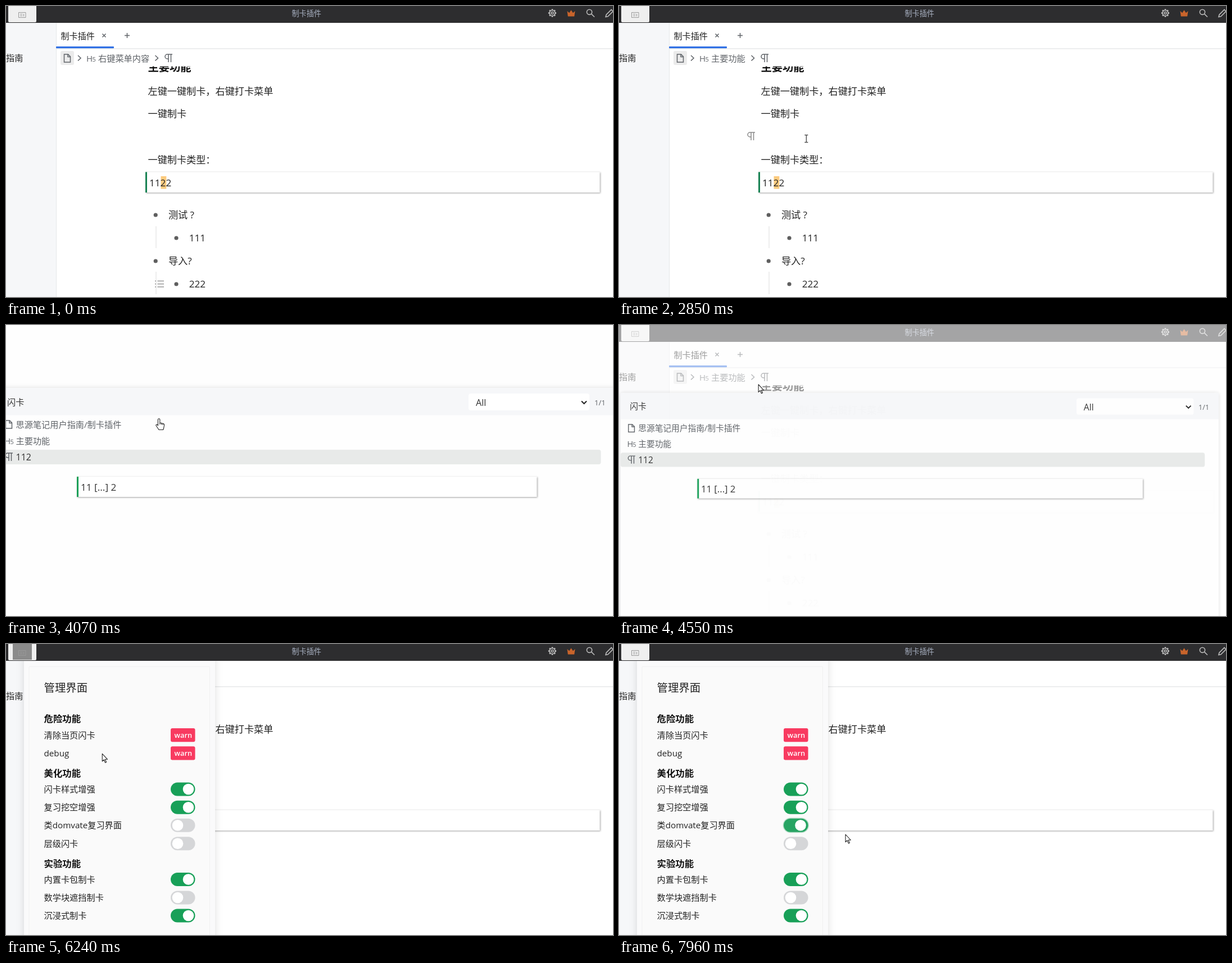
An HTML page for the animation above (8 s loop, 1080x518 px).

```html
<!DOCTYPE html>
<html lang="zh-CN">
<head>
<meta charset="utf-8">
<style>
  html, body { margin: 0; width: 100%; height: 100%; overflow: hidden; background: #fff; }
  svg { display: block; width: 100vw; height: 100vh; }
  text { font-family: "Open Sans", "Noto Sans CJK SC", "Noto Sans CJK", sans-serif; white-space: pre; }
  .line { fill: none; stroke: #5f6368; stroke-width: 1.5; }
  .lift { filter: drop-shadow(1px 1.5px 1.5px rgba(0, 0, 0, .38)); }
  .cursor { fill: #fff; stroke: #222; stroke-width: 1.1; stroke-linejoin: round; }
</style>
</head>
<body>
<svg id="stage" viewBox="0 0 1080 518"></svg>
<script>
const INK = '#222', GREY = '#5f6368', BODY = 17.15, LABEL = 15.2;

// Text placed by its left edge and vertical middle
const text = (x, y, size, str, fill = INK, extra = '') =>
  `<text x="${x}" y="${y + size * .37}" font-size="${size}" fill="${fill}" ${extra}>${str}</text>`;
const rect = (x, y, w, h, fill, r = 0, extra = '') =>
  `<rect x="${x}" y="${y}" width="${w}" height="${h}" rx="${r}" fill="${fill}" ${extra}/>`;
const line = (d, extra = '') => `<path class="line" d="${d}" ${extra}/>`;
const dot = (x, y, r = 3.6, fill = '#5f5f5f', extra = '') =>
  `<circle cx="${x}" cy="${y}" r="${r}" fill="${fill}" ${extra}/>`;
const group = (id, content) => `<g id="${id}">${content}</g>`;

const chevron = x => line(`M${x - 2.5} 88l5 4.7-5 4.7`);
const pageIcon = (x, y) => line(`M${x - 5.5} ${y - 7}h7l4 4v10h-11zM${x + 1} ${y - 7}v4.5h4.5`);
const pilcrow = (x, y, extra) =>
  line(`M${x + 7} ${y - 7}H${x - 2}a4 4 0 0 0 0 8h2M${x} ${y - 7}v14M${x + 4.5} ${y - 7}v14`, extra);
const heading5 = (x, y, fill = GREY) => text(x, y, 15, 'H', fill) + text(x + 10.5, y + 1.5, 11, '5', fill);
const card = (x, y, w, h, green) =>
  rect(x, y, w, h, '#fff', 0, 'class="lift"') + rect(x, y, 3, h, green);

const crumb = (id, label, shift) => group(id,
  text(164, 93, LABEL, label, GREY) + `<g transform="translate(${shift})">${chevron(268)}${pilcrow(289, 93)}</g>`);

const bullet = (x, y, str) => dot(x, y) + text(x + 22.7, y, BODY, str);

const doc =
  rect(0, 30, 89, 488, '#f6f7f9') + rect(89, 30, 1, 488, '#e6e7e9') +
  text(0, 92, LABEL, '指南') +
  text(252.5, 109, 19.3, '主要功能', '#111', 'font-weight="700"') +
  rect(90, 30, 990, 77.5, '#fff') + rect(89, 75.5, 991, 1, '#dcdee0') +
  text(97.5, 53, 15.1, '制卡插件') + rect(89, 72, 103, 3.2, '#2f6fe4', 1) +
  line('M171.5 49.5l6 6m0-6l-6 6M211 52.5h9M215.5 48v9') +
  rect(97, 80, 24, 25, '#ebebeb', 3) + pageIcon(109, 93) + chevron(130.5) + heading5(143, 93) +
  crumb('crumbBefore', '右键菜单内容', 0) + crumb('crumbAfter', '主要功能', -30) +
  text(252.5, 151.5, BODY, '左键一键制卡，右键打卡菜单') +
  text(252.5, 191.5, BODY, '一键制卡') +
  text(252.5, 273.5, BODY, '一键制卡类型：') +
  card(248, 295.5, 808.5, 36.5, '#1a8455') +
  rect(275.5, 303, 9.8, 22.5, '#fdcb7f') + text(255, 314.5, BODY, '1122') +
  rect(266.5, 392, 1, 39, '#dedede') + rect(266.5, 473, 1, 40, '#dedede') +
  bullet(266.2, 372, '测试 ?') + bullet(303, 413, '111') +
  bullet(266.2, 454, '导入?') + bullet(303, 495, '222') +
  group('listGutter', [489.5, 494.7, 500].map(y =>
    line(`M265 ${y}h2m2.5 0h11.5`, 'style="stroke:#999"')).join('')) +
  group('blankGutter', pilcrow(235, 232, 'style="stroke:#888"')) +
  group('headGutter', heading5(207.5, 127, '#8a8a8a') + '<path d="M233 122.5h11l-5.5 8.5z" fill="#777"/>') +
  group('caret', rect(252, 221, 1.3, 23, INK));

const gearTeeth = Array.from({ length: 8 }, (_, i) =>
  `<path d="M972 5.4v2.4" stroke="#bbb" stroke-width="2.6" transform="rotate(${i * 45} 972 12.5)"/>`).join('');

const topBar =
  rect(0, 0, 1080, 30, '#2d2d2f') +
  text(508.5, 13.5, 13.1, '制卡插件', '#a9b2c3') +
  gearTeeth + '<g fill="none" stroke="#bbb" stroke-width="1.6"><circle cx="972" cy="12.5" r="5"/>' +
  '<circle cx="972" cy="12.5" r="2"/><circle cx="1038" cy="10.8" r="4.6"/>' +
  '<path d="M1041.5 14.2l5.5 5.3M1067 19.5l1-4 9-9 3 3-9 9z"/></g>' +
  '<path d="M998.5 9l3.7 3.3 3.3-5 3.3 5 3.7-3.3-1.3 9.5h-11.4z" fill="#c8642b"/>' +
  rect(4, -3, 50, 32, '#efefef', 2) + group('pressed', rect(12, 0, 34, 28, '#8b8b8b')) +
  '<path d="M22.5 11.5h12.5v9h-12.5zM25 14.5h4.5M25 17.5h4.5M31.5 14v4.5" fill="none" stroke="#999"/>';

const dialog =
  rect(-15, 112, 1099, 700, '#fefefe', 4, 'style="filter:drop-shadow(0 0 4px rgba(0,0,0,.13))"') +
  rect(-15, 112.5, 1099, 48, '#f6f7f9') +
  text(2, 137, LABEL, '闪卡', '#333') +
  rect(823, 122, 215, 30, '#fff', 4) + text(836, 138, 16.2, 'All', '#333') +
  line('M1024 135.5l4.5 4.5 4.5-4.5', 'style="stroke:#222;stroke-width:2"') +
  text(1047, 138, 13, '1/1', GREY) +
  line('M1103 126l14 14m0-14l-14 14') +
  group('path',
    pageIcon(5, 177) + text(17.5, 177, LABEL, '思源笔记用户指南/制卡插件', GREY) +
    heading5(-3, 206) + text(17.5, 206, LABEL, '主要功能', GREY) +
    rect(-15, 222, 1073.5, 26, '#e8eae9', 4) + pilcrow(5, 235) + text(17.5, 235, 16, '112', '#333')) +
  group('flashcard', card(126, 270, 818.5, 36, '#18a058') + text(133, 288.5, BODY, '11 [...] 2', '#333'));

const warn = y => rect(293, y - 12, 43.5, 24.3, '#f83a60', 3) +
  text(299.5, y, 12.8, 'warn', '#fff', 'font-weight="600"');
const toggle = on => y => rect(293, y - 12, 43.5, 24, on ? '#18a058' : '#d5d6d8', 12) +
  dot(on ? 324.5 : 305.5, y, 9.8, '#fff');
const on = toggle(true), off = toggle(false);
const liveToggle = y =>
  rect(291.5, y - 13.5, 46.5, 27, '#b9e0cb', 13.5, 'id="ring"') +
  rect(293, y - 12, 43.5, 24, '#d5d6d8', 12) + rect(293, y - 12, 43.5, 24, '#27a463', 12, 'id="track"') +
  dot(305.5, y, 9.8, '#fff', 'id="knob"');

// Label, height, control; rows without a control are section titles
const rows = [
  ['危险功能', 132.5], ['清除当页闪卡', 162, warn], ['debug', 194.3, warn],
  ['美化功能', 229.5], ['闪卡样式增强', 258.5, on], ['复习挖空增强', 290.7, on],
  ['类domvate复习界面', 322.7, liveToggle], ['层级闪卡', 355.3, off],
  ['实验功能', 390.5], ['内置卡包制卡', 419, on], ['数学块遮挡制卡', 451.5, off], ['沉浸式制卡', 483.5, on]
];
const panel =
  rect(32, 20, 340, 520, '#fafafb', 0, 'style="filter:drop-shadow(0 3px 7px rgba(0,0,0,.13))"') +
  rect(41, 40, 321.5, 500, '#fafafa', 2, 'stroke="#f0f0f1"') +
  text(67.5, 78, 19.4, '管理界面') +
  rows.map(([label, y, control]) => control
    ? text(67.5, y, LABEL, label) + control(y)
    : text(67.5, y, 16.4, label, '#111', 'font-weight="700"')).join('');

const tooltip = rect(52, 84, 177, 27, '#3c3c3c', 4) +
  text(60, 98, 13, '思源笔记用户指南/制卡插件', '#fff');

const $ = id => document.getElementById(id);
$('stage').innerHTML =
  group('docLayer', doc) + group('panel', panel) + group('topBar', topBar) +
  group('tooltip', tooltip) +
  rect(0, 0, 1080, 518, '#fefefe', 0, 'id="veil"') + group('dialog', dialog) +
  group('cursor',
    '<path id="beam" d="M-3-6.5h2.2L0-5.8.8-6.5H3M0-5.8V5.8M-3 6.5h2.2L0 5.8.8 6.5H3" fill="none" stroke="#333" stroke-width="1.2"/>' +
    '<path id="arrow" class="cursor" d="M0 0v13.5l3-2.8 2.3 5.2 2-1-2.3-4.9h4.3z"/>' +
    '<path id="hand" class="cursor" d="M-1.6 1.5a1.7 1.7 0 0 1 3.4 0V7l6 1.5c1.4.4 2 1.2 1.8 2.7l-.9 4.8-1 3.5H0L-5 12c-.8-1.3 1-2.5 2-1.5l1.4 1.4zM1.8 7v3M4.5 8v2.5M7 8.5v2.5"/>');

const show = (id, visible) => { $(id).style.display = visible ? '' : 'none'; };
const fade = (id, alpha) => { show(id, alpha > 0); $(id).style.opacity = alpha; };
const ramp = (t, from, to) => Math.min(1, Math.max(0, (t - from) / (to - from)));

// Pointer way points: time, x, y
const way = [
  [130, 822, 453], [280, 822, 453], [1040, 111, 40], [1110, 98, 32], [1300, 72, 18],
  [1640, 250, 218], [1850, 315, 243], [1920, 322, 240], [1990, 335, 237], [3000, 333, 236],
  [3930, 333, 236], [4070, 272, 167], [4340, 273, 166], [4480, 252, 104], [4700, 240, 110],
  [4900, 112, 92], [5150, 53, 10], [5420, 30, 10], [6050, 30, 10], [6240, 171, 195],
  [6750, 311, 348], [6870, 311, 348], [7080, 311, 331], [7280, 311, 330], [7350, 312, 327],
  [7650, 312, 327], [7960, 403, 339], [8000, 403, 339]
];
const shapes = [
  [0, ''], [130, 'beam'], [1080, 'arrow'], [1520, 'beam'], [3070, 'hand'],
  [4470, 'arrow'], [4860, 'hand'], [4970, 'arrow'], [6700, 'hand'], [7730, 'arrow']
];

function pointer(t) {
  const i = Math.max(1, way.findIndex(p => p[0] >= t));
  const [a, b] = [way[i - 1], way[i]], k = ramp(t, a[0], b[0]);
  $('cursor').setAttribute('transform', `translate(${a[1] + (b[1] - a[1]) * k} ${a[2] + (b[2] - a[2]) * k})`);
  const shape = shapes.filter(s => s[0] <= t).pop()[1];
  ['beam', 'arrow', 'hand'].forEach(id => show(id, id === shape));
}

function draw(t) {
  const clicked = t >= 2250;
  show('crumbBefore', !clicked);
  show('crumbAfter', clicked);
  show('listGutter', !clicked);
  show('blankGutter', clicked && t < 4480);
  show('headGutter', t >= 4620);
  show('caret', clicked && t < 2850);

  const open = ramp(t, 2960, 3340) * (1 - ramp(t, 4480, 4760));
  fade('veil', open ** 1.9);
  fade('dialog', Math.min(1, open * 1.3));
  const scale = .875 + .125 * open;
  $('dialog').setAttribute('transform', `translate(546 390) scale(${scale}) translate(-546 -390)`);
  const expanded = t >= 4000;
  show('path', expanded);
  $('flashcard').setAttribute('transform', `translate(0 ${expanded ? 0 : -58.5})`);

  fade('tooltip', .92 * ramp(t, 4900, 4980) * (1 - ramp(t, 5090, 5270)));
  show('pressed', t >= 5630 && t < 6320);
  show('panel', t >= 5890);
  const flip = ramp(t, 7560, 7800), eased = flip * flip * (3 - 2 * flip);
  fade('ring', eased);
  fade('track', eased);
  $('knob').setAttribute('cx', 305.5 + 17.5 * eased);
  pointer(t);
}

const start = performance.now();
(function tick() {
  draw((performance.now() - start) % 8000);
  requestAnimationFrame(tick);
})();
</script>
</body>
</html>
```
